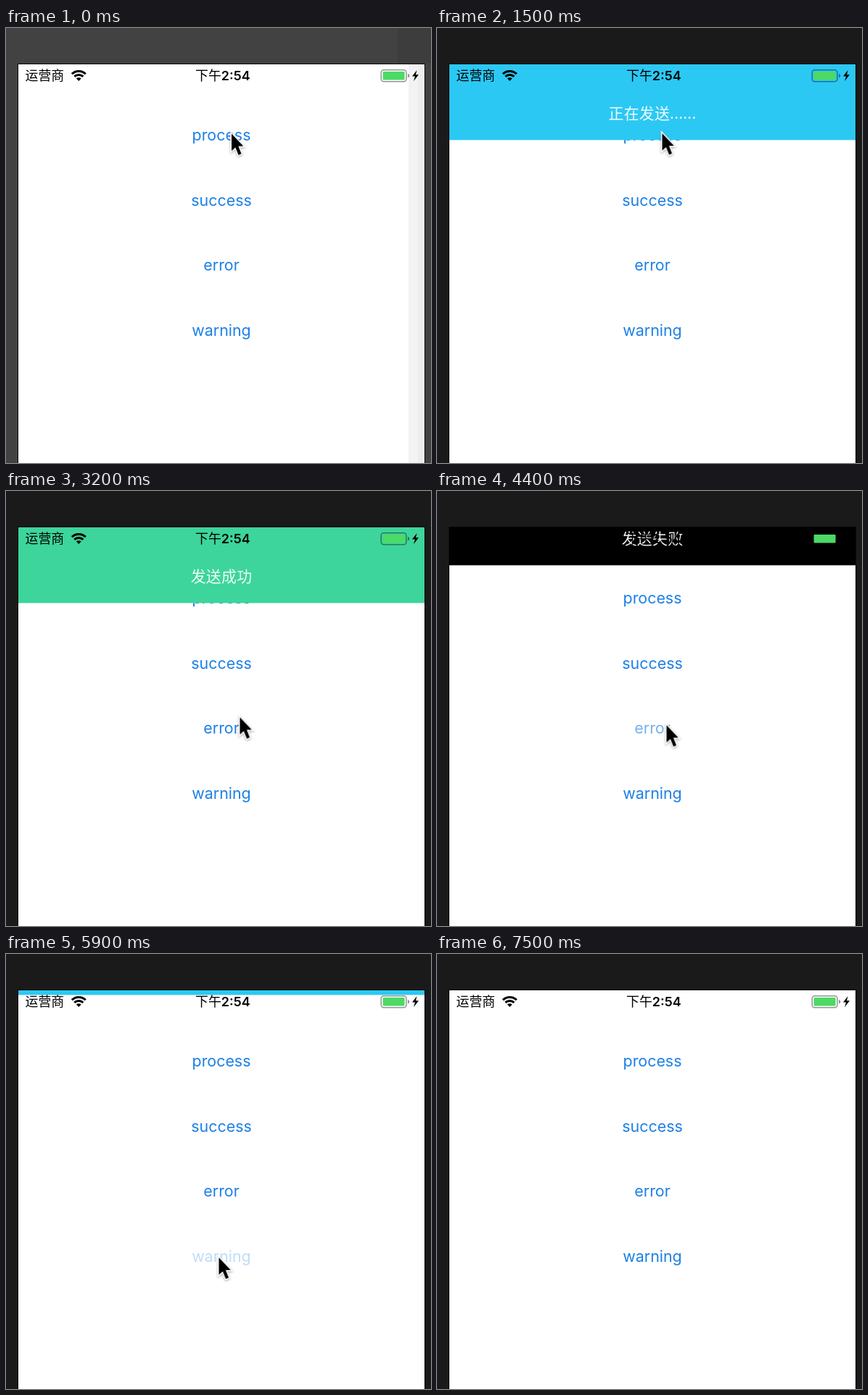
An HTML page for the animation above (7600 ms loop, 586 by 599 pixels).

```html
<!DOCTYPE html>
<html lang="zh">
<head>
<meta charset="utf-8">
<title>Banner demo</title>
<style>
  html, body { margin: 0; width: 100%; height: 100%; overflow: hidden; background: #1a1a1a; }
  svg { display: block; }
  .loop { animation: 7600ms linear infinite both; animation-delay: calc(var(--at, 7600) * 1ms - 7600ms); }

  .btn { font: 21.4px Inter, sans-serif; fill: #1c80e6; text-anchor: middle; animation-name: press; }
  .banner { animation-name: drop; }
  .banner.sticky { animation-name: drop-sticky; }
  .banner text {
    font: 300 20.9px "Noto Sans CJK SC", "Noto Sans CJK", sans-serif;
    letter-spacing: .25px; fill: #fff; fill-opacity: .93; text-anchor: middle;
  }
  .carrier { font: 17.9px "Noto Sans CJK SC", "Noto Sans CJK", sans-serif; }
  .clock { font: 600 17.9px Inter, "Noto Sans CJK SC", "Noto Sans CJK", sans-serif; text-anchor: middle; }
  .clock .half { font-weight: 500; }
  .intro { animation-name: intro; animation-timing-function: step-end; }
  .cursor { animation-name: roam; animation-timing-function: ease-in-out; filter: drop-shadow(0 1.5px 1.5px rgba(0, 0, 0, .35)); }

  /* touch down, then fade back */
  @keyframes press {
    0%, 1% { opacity: .2; }
    5.87%, 100% { opacity: 1; }
  }
  /* 400 ms in, out again 1200 ms after the start */
  @keyframes drop {
    0% { transform: translateY(-105px); animation-timing-function: ease-in-out; }
    5.263% { transform: none; }
    15.79% { transform: none; animation-timing-function: ease-in-out; }
    19.737%, 100% { transform: translateY(-105px); }
  }
  /* stays until the next banner has covered it */
  @keyframes drop-sticky {
    0% { transform: translateY(-105px); animation-timing-function: ease-in-out; }
    5.263%, 39% { transform: none; }
    39.01%, 100% { transform: translateY(-105px); }
  }
  @keyframes intro {
    0% { opacity: 1; }
    1.3%, 100% { opacity: 0; }
  }
  @keyframes roam {
    0% { transform: translate(311px, 145.5px); }
    6%, 19.74% { transform: translate(310.5px, 145px); }
    29%, 38.2% { transform: translate(313px, 229.5px); }
    42.1% { transform: translate(322.5px, 311.5px); }
    46%, 67.1% { transform: translate(316.5px, 322.5px); }
    75.7%, 84.2% { transform: translate(293.5px, 418px); }
    96%, 100% { transform: translate(301px, 625px); }
  }
</style>
</head>
<body>
<svg width="586" height="599" viewBox="0 0 586 599">
  <defs>
    <clipPath id="screen"><rect x="17" y="50" width="560" height="549"/></clipPath>
  </defs>

  <g class="loop intro">
    <rect width="586" height="599" fill="#424242"/>
    <rect x="540" width="46" height="49" fill="#3d3d3d"/>
  </g>
  <rect x="16" y="49" width="562" height="551" fill="#0a0a0a"/>
  <rect x="17" y="50" width="560" height="549" fill="#fff"/>
  <g class="loop intro">
    <rect x="555" y="50" width="22" height="549" fill="#f3f3f3"/>
    <rect x="568" y="50" width="9" height="549" fill="#ededed"/>
  </g>

  <text class="loop btn" x="297" y="155" style="--at: 90">process</text>
  <text class="loop btn" x="297" y="244.5" style="--at: 2524">success</text>
  <text class="loop btn" x="297" y="334" style="--at: 4134">error</text>
  <text class="loop btn" x="297" y="423.5" style="--at: 5790">warning</text>

  <g clip-path="url(#screen)">
    <g class="loop banner sticky" style="--at: 100">
      <rect x="17" y="50" width="560" height="104.3" fill="#2cc8f4"/>
      <text x="297" y="124.9">正在发送......</text>
    </g>
    <g class="loop banner" style="--at: 2600">
      <rect x="17" y="50" width="560" height="104.3" fill="#3dd59b"/>
      <text x="297" y="124.9">发送成功</text>
    </g>
    <g class="loop banner" style="--at: 4200">
      <rect x="17" y="50" width="560" height="104.3" fill="#000"/>
      <text x="297" y="124.9">发送失败</text>
    </g>
    <g class="loop banner" style="--at: 5828">
      <rect x="17" y="50" width="560" height="104.3" fill="#2cc8f4"/>
      <text x="297" y="124.9">发送警告</text>
    </g>
  </g>

  <!-- status bar -->
  <text class="carrier" x="26.5" y="72.3">运营商</text>
  <g transform="translate(100.3 73)">
    <path d="M0 0L-3.4 -3.5A4.9 4.9 0 0 1 3.4 -3.5Z"/>
    <path d="M-6 -6.1A8.6 8.6 0 0 1 6 -6.1M-9.5 -9.7A13.6 13.6 0 0 1 9.5 -9.7" fill="none" stroke="#000" stroke-width="3"/>
  </g>
  <text class="clock" x="298.8" y="72.2"><tspan class="half">下午</tspan>2:54</text>
  <g opacity=".42">
    <rect x="517.2" y="57.7" width="34.8" height="16" rx="3.6" fill="none" stroke="#000" stroke-width="1.5"/>
    <path d="M554 63Q556.4 63.6 556.4 65.7T554 68.4Z"/>
  </g>
  <rect x="519.6" y="60" width="30" height="11.4" rx="1.2" fill="#4cd964"/>
  <path d="M566.6 58L560 66.6H564L562 73.2L569 64.2H565Z"/>

  <g class="loop cursor">
    <path d="M0 0V23.8L5.3 18.9L9.6 29.4L13.6 27.7L9.4 17.3H16.4Z" stroke="#fff" stroke-width="3.2" paint-order="stroke"/>
  </g>
</svg>
</body>
</html>
```
